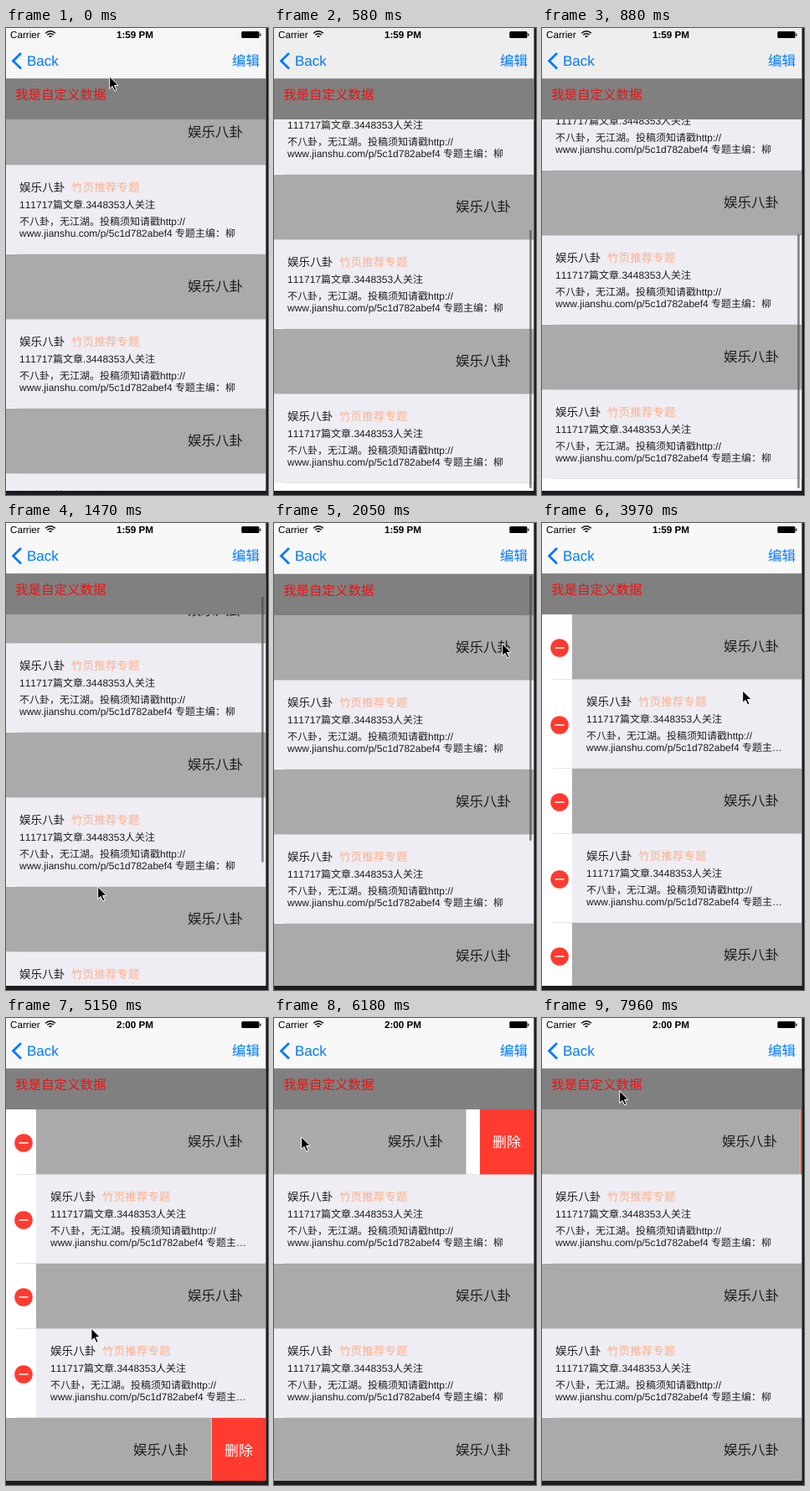
An HTML page with a canvas for the animation above (8 s loop, 313 by 557 pixels).

```html
<!DOCTYPE html>
<html lang="zh-CN">
<head>
<meta charset="utf-8">
<style>
  html, body { margin: 0; width: 100%; height: 100%; overflow: hidden; background: #1b1d20; }
  canvas { display: block; width: 313px; height: 557px; }
</style>
</head>
<body>
<canvas id="stage"></canvas>
<script>
const canvas = document.getElementById('stage');
const ctx = canvas.getContext('2d');
const ratio = window.devicePixelRatio || 1;
canvas.width = 313 * ratio;
canvas.height = 557 * ratio;

const LOOP = 8000, STEP = 147;
const WIDTH = 310.5, HEIGHT = 552, NAV = 60, HEADER = 49;
const GRAY_ROW = 78, LIGHT_ROW = 106, MAX_SCROLL = 293;
const EDIT_SHIFT = 36, BUTTON_WIDTH = 65, BUTTON_LEFT = 246;
const BLUE = '#007aff', RED = '#ff3b30', INK = '#1c1c1c';
const FONT = '"Liberation Sans", "Noto Sans CJK SC", "Noto Sans CJK", sans-serif';

const TRAVEL = 400;
const EDIT_BUTTON = { x: 287, y: 38 };
const stops = [
  { at: 0, x: 123, y: 58 },
  { at: 441, x: 120, y: -30 },
  { at: 1470, x: 109, y: 434 },
  { at: 2058, x: 272, y: 144 },
  { at: 2340, ...EDIT_BUTTON },
  { at: 3969, x: 239, y: 200 },
  { at: 4850, x: 22, y: 512 },
  { at: 5400, ...EDIT_BUTTON },
  { at: 5850, x: 125, y: 145 },
  { at: 6174, x: 32, y: 142 },
  { at: 7056, x: 140, y: 150 },
  { at: 7938, x: 92, y: 87 },
];

const clamp = (value, low, high) => Math.max(low, Math.min(high, value));
const progress = (t, from, to) => clamp((t - from) / (to - from), 0, 1);
const bump = (t, from, to) => Math.sin(Math.PI * progress(t, from, to));
function ease(t, from, to) {
  const k = progress(t, from, to);
  return k * k * (3 - 2 * k);
}

// Flick to the end, then drag back to the top, each with a bounce.
function scrollAt(t) {
  return Math.round(207 + 86 * ease(t, 147, 588) + 14.7 * bump(t, 441, 1176)
    - MAX_SCROLL * ease(t, 1176, 1564) - 40 * bump(t, 1500, 2063));
}

const editAt = t => ease(t, 2850, 3230) - ease(t, 5450, 5700);
const bottomRowAt = t => BUTTON_WIDTH * (ease(t, 5450, 5650) - ease(t, 4880, 5150));
// Swiped a little too far, settles on the button width, then closes.
const topRowAt = t => -81 * ease(t, 5850, 6174) + 16 * ease(t, 6174, 6468)
  + BUTTON_WIDTH * ease(t, 7497, 7990);

function cursorAt(t) {
  let { x, y } = stops[0];
  for (let i = 1; i < stops.length; i++) {
    const from = stops[i - 1], to = stops[i];
    const k = ease(t, Math.max(from.at, to.at - TRAVEL), to.at);
    x += (to.x - from.x) * k;
    y += (to.y - from.y) * k;
  }
  return { x, y };
}

function rect(x, y, w, h, color) {
  ctx.fillStyle = color;
  ctx.fillRect(x, y, w, h);
}

function clipRect(x, y, w, h) {
  ctx.beginPath();
  ctx.rect(x, y, w, h);
  ctx.clip();
}

function text(string, x, y, size, color = INK, align = 'left', weight = '') {
  ctx.font = `${weight} ${size}px ${FONT}`;
  ctx.fillStyle = color;
  ctx.textAlign = align;
  ctx.fillText(string, x, y);
}

function polyline(points) {
  ctx.beginPath();
  points.forEach(([x, y]) => ctx.lineTo(x, y));
}

function minusButton(x, y, turn) {
  ctx.save();
  ctx.translate(x, y);
  ctx.rotate(turn * Math.PI / 2);
  ctx.fillStyle = RED;
  ctx.beginPath();
  ctx.arc(0, 0, 10.8, 0, 7);
  ctx.fill();
  rect(-5.5, -.8, 11, 1.5, '#fff');
  ctx.restore();
}

function deleteButton(y, height, dx) {
  const left = Math.max(WIDTH + dx, BUTTON_LEFT);
  ctx.save();
  clipRect(left, y, WIDTH - left, height);
  rect(left, y, WIDTH - left, height, RED);
  text('删除', 278, y + 45, 17, '#fff', 'center');
  ctx.restore();
}

function lightLabels(x, y, truncated) {
  text('娱乐八卦', x, y + 31, 13.6);
  text('竹页推荐专题', x + 62, y + 31, 13.6, '#ffb08c');
  text('111717篇文章.3448353人关注', x, y + 51, 12);
  text('不八卦，无江湖。投稿须知请戳http://', x, y + 70.5, 12);
  text('www.jianshu.com/p/5c1d782abef4 ' + (truncated ? '专题主…' : '专题主编：柳'), x, y + 84.5, 12);
}

function drawRow(y, light, edit, dx) {
  const height = light ? LIGHT_ROW : GRAY_ROW;
  const left = dx + edit * EDIT_SHIFT;
  ctx.save();
  clipRect(0, y, WIDTH, height);
  rect(0, y, WIDTH, height, '#fff');
  if (dx < 0) deleteButton(y, height, dx);
  rect(left, y, WIDTH + dx - left, height - .5, light ? '#eeedf3' : '#aaa');
  rect(13, y + height - .5, WIDTH - 13, .5, '#c8c7cc');
  // Labels dissolve in the bar's blur, so only the backgrounds shine through it.
  clipRect(0, NAV, WIDTH, HEIGHT);
  ctx.translate(dx, 0);
  if (light) lightLabels(16 + 37 * edit, y, edit > 0);
  else text('娱乐八卦', 217, y + 43.5, 16.5);
  if (edit > 0) minusButton(21 - 37 * (1 - edit), y + (light ? 54 : 40), -dx / BUTTON_WIDTH);
  ctx.restore();
}

function drawTable(t, scroll) {
  let y = NAV + HEADER - scroll;
  for (let i = 0; i < 8; i++) {
    const light = i % 2 === 1;
    const dx = i === 0 ? topRowAt(t) : i === 4 ? bottomRowAt(t) : 0;
    drawRow(y, light, editAt(t), dx);
    y += light ? LIGHT_ROW : GRAY_ROW;
  }
  const headerY = NAV + Math.max(0, -scroll);
  rect(0, headerY, WIDTH, HEADER, '#808080');
  text('我是自定义数据', 11, headerY + 25, 15.5, '#ea1212');
}

function drawScrollBar(t, scroll) {
  const inside = clamp(scroll, 0, MAX_SCROLL);
  const over = scroll - inside;
  const top = 63 + 169 * inside / MAX_SCROLL + Math.max(0, over);
  ctx.globalAlpha = ease(t, 0, 147) - ease(t, 2058, 2340);
  ctx.fillStyle = 'rgba(70,70,70,.65)';
  ctx.beginPath();
  ctx.roundRect(305.2, top, 2.5, 317 - Math.abs(over), 1.2);
  ctx.fill();
  ctx.globalAlpha = 1;
}

function drawStatusBar(t) {
  text('Carrier', 5, 12.2, 11.7, '#000');
  text(t < 4500 ? '1:59 PM' : '2:00 PM', 154, 12.2, 11.7, '#000', 'center', 'bold');
  ctx.strokeStyle = '#000';
  ctx.lineWidth = 1.5;
  for (const radius of [8.2, 5.2, 2]) {
    ctx.beginPath();
    ctx.arc(53, 12, radius, -Math.PI * .75, -Math.PI * .25);
    ctx.stroke();
  }
  ctx.fillStyle = '#000';
  ctx.beginPath();
  ctx.roundRect(281.3, 4, 21.2, 8, 1.5);
  ctx.fill();
  rect(303.3, 6.6, 1.2, 3, '#000');
}

function drawNav(t) {
  rect(0, 0, WIDTH, NAV, 'rgba(247,247,247,.88)');
  rect(0, NAV, WIDTH, .5, '#a8a8a8');
  drawStatusBar(t);
  ctx.strokeStyle = BLUE;
  ctx.lineWidth = 2.8;
  polyline([[18, 30], [8.5, 39.2], [18, 48.5]]);
  ctx.stroke();
  text('Back', 25, 45, 17, BLUE);
  const pressed = (t > 2750 && t < 2900) || (t > 5380 && t < 5480);
  ctx.globalAlpha = pressed ? .3 : 1;
  text('编辑', 270, 45, 16.5, BLUE);
  ctx.globalAlpha = 1;
}

function drawCursor(t) {
  const { x, y } = cursorAt(t);
  ctx.save();
  ctx.translate(x + .7, y);
  polyline([[0, 0], [0, 14.5], [3.4, 11.4], [6, 17], [8.3, 16], [5.8, 10.5], [10.3, 10.3]]);
  ctx.closePath();
  ctx.fillStyle = '#000';
  ctx.fill();
  ctx.strokeStyle = '#fff';
  ctx.lineWidth = 1;
  ctx.stroke();
  ctx.restore();
}

function draw(t) {
  const scroll = scrollAt(t);
  ctx.setTransform(ratio, 0, 0, ratio, 0, 0);
  ctx.fontKerning = 'none';
  ctx.textRendering = 'geometricPrecision';
  rect(0, 0, 313, 557, '#1b1d20');
  ctx.save();
  clipRect(0, 0, WIDTH, HEIGHT);
  rect(0, 0, WIDTH, HEIGHT, '#fff');
  drawTable(t, scroll);
  drawScrollBar(t, scroll);
  drawNav(t);
  drawCursor(t);
  ctx.restore();
}

// The screen updates in discrete steps, like a low-rate recording.
function tick() {
  const t = performance.now() % LOOP;
  draw(Math.floor((t + 15) / STEP) * STEP);
  requestAnimationFrame(tick);
}
tick();
</script>
</body>
</html>
```
